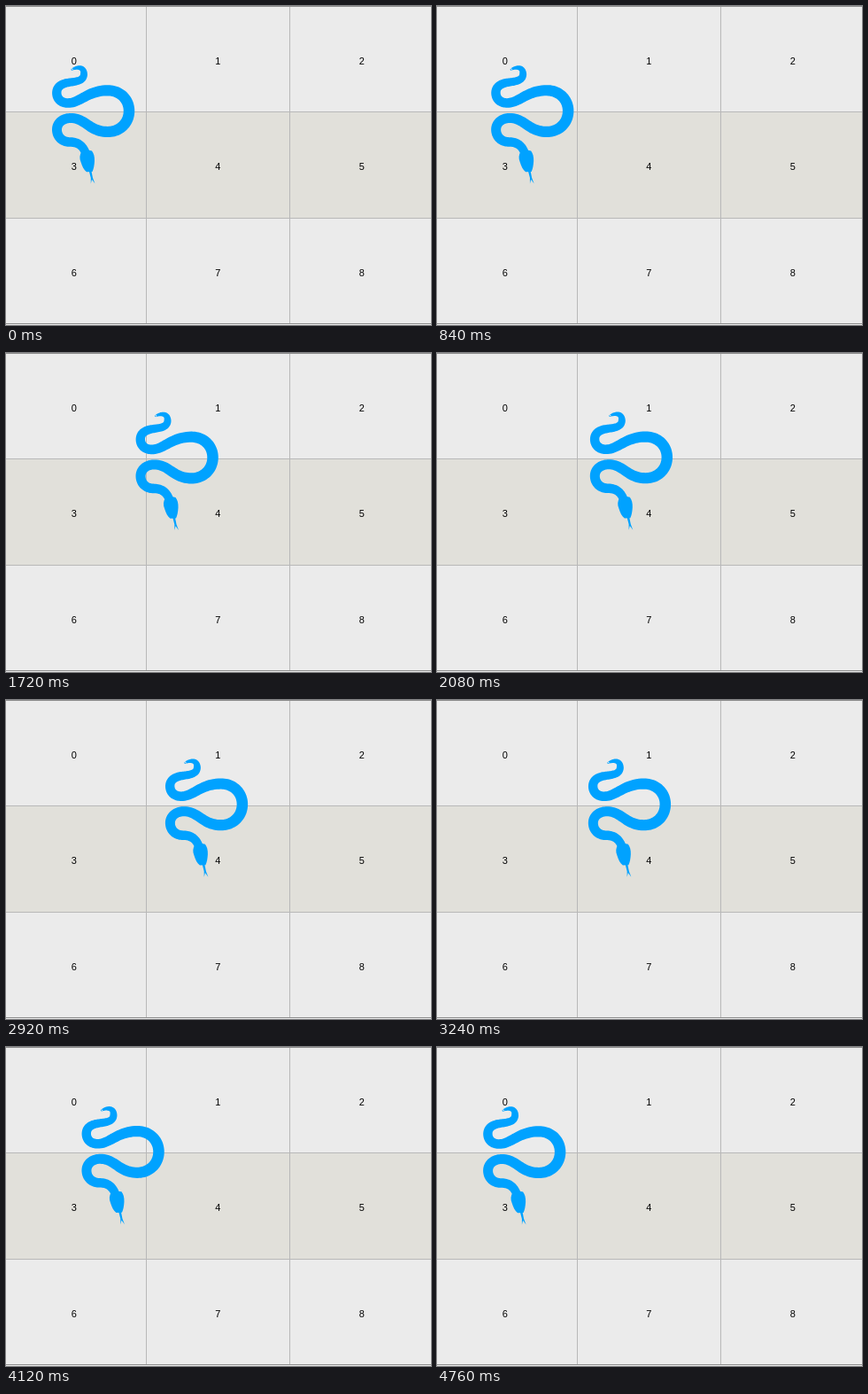
Write an HTML page with a canvas that moves like this. It is 480 px wide and 360 px high and loops after 4800 ms.

```html
<!DOCTYPE html>
<html lang="en">
<head>
<meta charset="utf-8">
<title>Snake over a grid</title>
<style>
  html, body { margin: 0; width: 100%; height: 100%; overflow: hidden; background: #ebebeb; }
  canvas { display: block; }
</style>
</head>
<body>
<canvas id="stage" width="480" height="360"></canvas>
<script>
const ctx = document.getElementById('stage').getContext('2d');
const LOOP = 4800, HOLD = 480, MOVE = 1920, STEP = 40;
const SHIFT = { x: 128, y: -0.8 };

// Centre line from tail to neck: two handles, end point, body width there.
const tail = { x: 74.6, y: 71.7, w: 2.2 };
const spine = [
  [79, 69, 88.3, 67.5, 88, 77, 8],
  [87.7, 86.5, 74, 85, 67, 87.2, 9.6],
  [60, 89.2, 57.3, 93, 57.3, 98, 10.4],
  [57.3, 104.5, 62, 109.5, 70, 109.5, 10.6],
  [84, 109.5, 92, 95.3, 115, 95.3, 12.2],
  [128.5, 95.3, 139, 105, 139, 118.5, 12.5],
  [139, 132, 128.5, 142, 115, 142, 12.2],
  [94, 142, 90, 126.5, 73, 126.5, 11],
  [64, 126.5, 57.5, 132, 57.5, 139.5, 11],
  [57.5, 148, 64, 153.5, 72, 153.5, 10.6],
  [82, 153.5, 87, 158, 90.5, 167, 9.5]
];
const head = new Path2D(
  'M85.5 164C83 168 82.8 172 84.5 176C86 181 88 185 91 187.3L97.5 187' +
  'C99 184 99.7 180 100 175C100.3 170 99 166 97 163.5Q92 162 85.5 164Z');
const tongue = new Path2D(
  'M93.7 186L96.5 186.5L98 194L100.5 200.5L97 195.8L95.8 200.5L95.8 194Z');

function bezier(a, b, c, d, s) {
  const r = 1 - s;
  return r * r * r * a + 3 * r * r * s * b + 3 * r * s * s * c + s * s * s * d;
}

function slope(a, b, c, d, s) {
  const r = 1 - s;
  return r * r * (b - a) + 2 * r * s * (c - b) + s * s * (d - c);
}

function buildBody() {
  const left = [], right = [], samples = 24;
  let { x, y, w } = tail;
  for (const [x1, y1, x2, y2, x3, y3, w3] of spine) {
    for (let i = 0; i <= samples; i++) {
      const s = i / samples;
      const px = bezier(x, x1, x2, x3, s), py = bezier(y, y1, y2, y3, s);
      const dx = slope(x, x1, x2, x3, s), dy = slope(y, y1, y2, y3, s);
      const k = (w + (w3 - w) * s) / 2 / Math.hypot(dx, dy);
      left.push([px - dy * k, py + dx * k]);
      right.push([px + dy * k, py - dx * k]);
    }
    [x, y, w] = [x3, y3, w3];
  }
  const path = new Path2D();
  for (const p of left.concat(right.reverse())) path.lineTo(...p);
  path.closePath();
  path.moveTo(tail.x + tail.w / 2, tail.y);
  path.arc(tail.x, tail.y, tail.w / 2, 0, Math.PI * 2);
  return path;
}
const body = buildBody();

// Ease in and out along the cubic curve (0.42, 0, 0.58, 1).
function ease(p) {
  let lo = 0, hi = 1;
  for (let i = 0; i < 24; i++) {
    const mid = (lo + hi) / 2;
    if (bezier(0, 0.42, 0.58, 1, mid) < p) lo = mid; else hi = mid;
  }
  return bezier(0, 0, 1, 1, lo);
}

function progress(t) {
  const half = LOOP / 2;
  const p = ease(Math.max(0, (t % half - HOLD) / MOVE));
  return t < half ? p : 1 - p;
}

function rect(color, x, y, w, h) {
  ctx.fillStyle = color;
  ctx.fillRect(x, y, w, h);
}

function drawGrid() {
  rect('#ebebeb', 0, 0, 480, 360);
  rect('#e1e0da', 0, 120, 480, 119);
  for (const x of [158, 320]) rect('#b8b8b8', x, 0, 1, 359);
  for (const y of [119, 239]) rect('#b8b8b8', 0, y, 480, 1);
  for (const y of [0, 358]) rect('#8c8c8c', 0, y, 480, 1);
  ctx.fillStyle = '#000';
  ctx.font = '11px "Liberation Sans", Arial, sans-serif';
  ctx.textAlign = 'center';
  for (let i = 0; i < 9; i++) {
    ctx.fillText(i, 76.7 + (i % 3) * 162.6, 65.5 + Math.floor(i / 3) * 119.5);
  }
}

function draw(now) {
  const t = Math.floor((now % LOOP) / STEP) * STEP;
  const p = progress(t);
  drawGrid();
  ctx.save();
  ctx.translate(SHIFT.x * p, SHIFT.y * p);
  ctx.fillStyle = '#00a2ff';
  for (const part of [body, head, tongue]) ctx.fill(part);
  ctx.restore();
}

let start;
function tick(now) {
  start ??= now;
  draw(now - start);
  requestAnimationFrame(tick);
}
requestAnimationFrame(tick);
</script>
</body>
</html>
```
